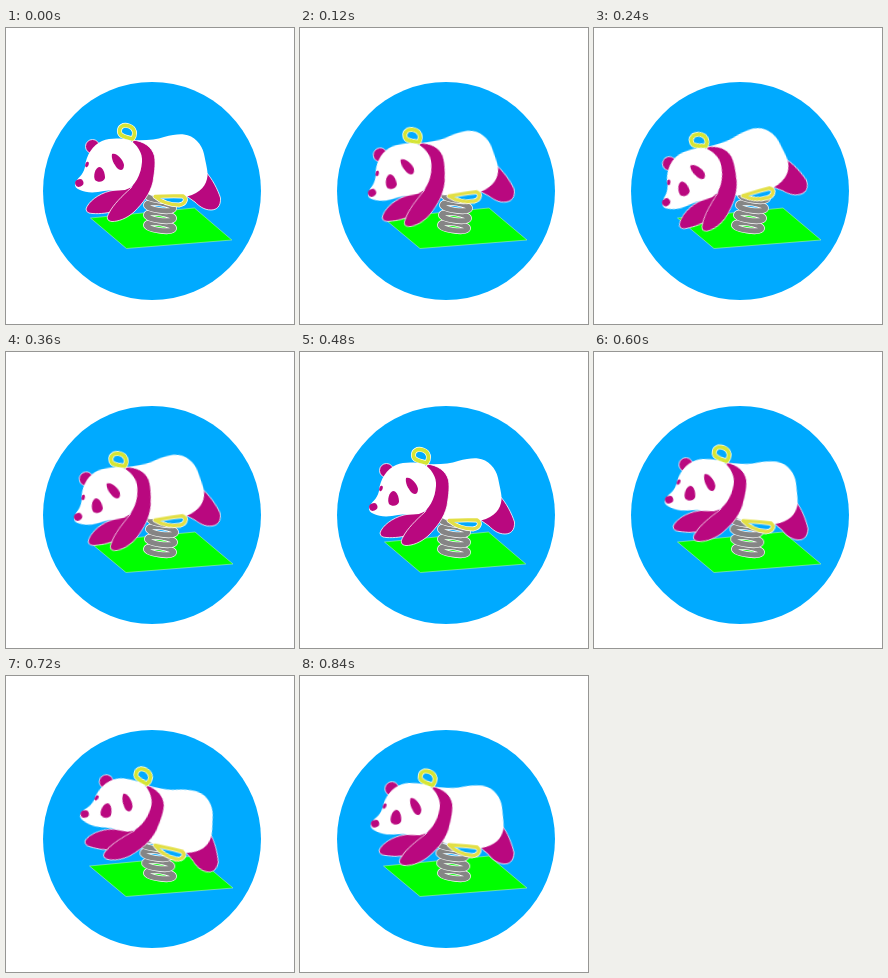
Recreate the animation shown at these times as an HTML page. Size 288 px wide and 296 px high, loop 0.96 s.

```html
<!DOCTYPE html>
<html lang="en">
<head>
<meta charset="utf-8">
<title>Panda spring rider</title>
<style>
  html, body { margin: 0; width: 100%; height: 100%; overflow: hidden; background: #fff; }
  svg { display: block; width: 288px; height: 296px; }
  #rider, #mat { transform-box: view-box; transform-origin: 146px 169px; }
  .line { stroke: #fff; stroke-width: 0.8; stroke-linejoin: round; }
  .plum { fill: #b9087f; }
  .white { fill: #fff; }
  .ring { fill: none; stroke-linecap: round; stroke-linejoin: round; }
</style>
</head>
<body>
<svg viewBox="0 0 288 296">
  <circle cx="146" cy="163" r="109" fill="#00aaff"/>
  <path id="mat" fill="#0f0" stroke="#a8eeb0" stroke-width="0.6" d="M83.5 190 L189 180 L227 212 L120 220.5 Z"/>
  <g id="spring"></g>
  <g id="rider">
    <!-- far arm and hind leg -->
    <path class="plum line" d="M80 181 C82 174 92 166 104 163 L126 159 C122 171 113 182 105 184 C97 186 87 186 83 185 Q80 184 80 181 Z"/>
    <path class="plum line" d="M199 143 C206 150 212 162 214.5 170 C215 178 211 182 205 182 C198 182 193 178 189 174 L179 167 Z"/>
    <!-- torso -->
    <path class="white" d="M126 112 Q146 113 158 109 C166 107 172 106 178 106.5 C188 107.5 196 116 198 126 C200 136 202 143 201.5 148 C200.5 157 195 165 181 168.5 C170 170 158 168 144 167 L128 160 Z"/>
    <!-- shoulder band and near arm -->
    <path class="plum line" d="M126 112 C138 113 146 119 148.5 128 C150 137 148 147 147 154 C144 166 137 175 128 184 C120 191 112 193.5 106 193.5 C101 193 100 190 103 185 C107 177 116 168 125 160 L134 142 Z"/>
    <!-- head -->
    <ellipse class="plum line" cx="86.5" cy="118.5" rx="7" ry="7"/>
    <path class="white" d="M69 155 C71 150 77 148 79 139 C80 127 87 117 96 113 C104 110 114 110 123 112 C131 116 137 125 136 134 C135 147 129 159 119 162 C110 163 104 162 98 163 C89 165 80 165 74 162 Q68 160 69 155 Z"/>
    <ellipse class="plum" cx="73.3" cy="155" rx="4.2" ry="3.7" transform="rotate(-20 73.3 155)"/>
    <ellipse class="plum" cx="81" cy="136.5" rx="1.7" ry="2.8" transform="rotate(20 81 136.5)"/>
    <path class="plum" d="M93 139 C97 139 99 145 99 150 C98 154 92 155 89 152 C87 148 89 140 93 139 Z"/>
    <path class="plum" d="M106 126 C110 124 117 131 118 137 C118 143 114 143 111 140 C108 136 105 131 106 126 Z"/>
    <!-- handles -->
    <g id="handles"></g>
  </g>
</svg>
<script>
  const STEP = 120;
  const ANGLES = [0, -7.7, -15, -7.7, 0, 5.8, 13.8, 5.8];
  const COIL_COUNT = 4;
  const COIL_GAP = 10;

  function add(parent, tag, attrs) {
    const el = document.createElementNS('http://www.w3.org/2000/svg', tag);
    for (const key in attrs) el.setAttribute(key, attrs[key]);
    return parent.appendChild(el);
  }

  // A coloured tube with a thin white outline on both sides.
  function tube(parent, tag, shape, color, width) {
    add(parent, tag, { ...shape, class: 'ring', stroke: '#fff', 'stroke-width': width + 1.4 });
    add(parent, tag, { ...shape, class: 'ring', stroke: color, 'stroke-width': width });
  }

  function play(el, pose) {
    const frames = [...ANGLES, ANGLES[0]].map((angle, i) => ({
      offset: i / ANGLES.length,
      transform: pose(angle),
      easing: 'step-end'
    }));
    el.animate(frames, { duration: STEP * ANGLES.length, iterations: Infinity });
  }

  const spring = document.getElementById('spring');
  for (let i = 0; i < COIL_COUNT; i++) {
    const coil = add(spring, 'g', {});
    const cy = 198.7 - COIL_GAP * i;
    tube(coil, 'ellipse', {
      cx: 154, cy, rx: 13.8, ry: 3.7, transform: `rotate(8 154 ${cy})`
    }, '#858585', 5);
    play(coil, a => `translate(${-0.13 * a * i}px, 0px)`);
  }

  const handles = document.getElementById('handles');
  tube(handles, 'path', {
    d: 'M126.5 111 C130 106 129 100 123 98 C117 96 113 99 113.5 104 C114 109 121 109 126.5 111 Z'
  }, '#d5e535', 3.6);
  const seat = 'M149 168.5 Q163 167.5 177 168 C181 170.5 180 176 173 177 C163 177 155 173.5 149 168.5 Z';
  add(handles, 'path', { d: seat, fill: '#00aaff' });
  tube(handles, 'path', { d: seat }, '#e2df45', 3.4);

  play(document.getElementById('rider'), a => `rotate(${a}deg)`);
  play(document.getElementById('mat'), a => `scaleX(${a ? 1 : 0.985})`);
</script>
</body>
</html>
```
